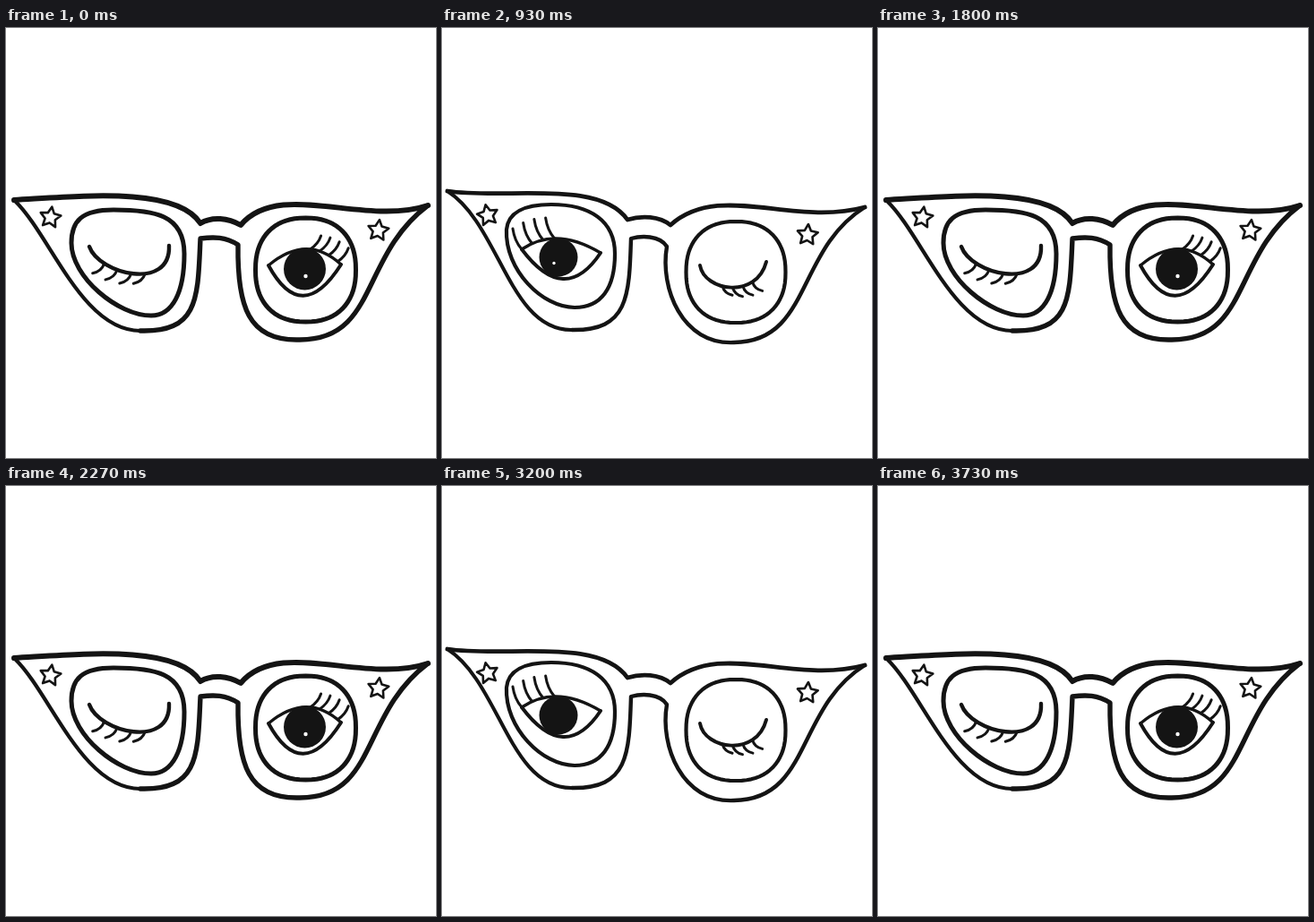
These frames come from a looping animation (480x480 px, 3990 ms). An HTML page with a canvas:

```html
<!DOCTYPE html>
<html lang="en">
<head>
<meta charset="utf-8">
<title>Winking glasses</title>
<style>
html, body { margin: 0; width: 100%; height: 100%; overflow: hidden; background: #fff; }
canvas { display: block; width: 480px; height: 480px; }
</style>
</head>
<body>
<canvas id="stage" width="480" height="480"></canvas>
<script>
const ctx = document.getElementById('stage').getContext('2d');
const INK = '#141414', LOOP = 3990, HALF = 1800, WINK = 930;
ctx.lineCap = ctx.lineJoin = 'round';

function pen(width, path) {
  ctx.lineWidth = width;
  ctx.stroke(new Path2D(path));
}

// Closed shape from a function of the angle
function ring(width, steps, point) {
  const pts = Array.from({ length: steps }, (_, i) => point(i * 2 * Math.PI / steps, i));
  pen(width, 'M' + pts.join('L') + 'Z');
}

function star(x, y, tilt) {
  ring(2.6, 10, (a, i) => {
    const r = i % 2 ? 6 : 12;
    return [x + r * Math.sin(a + tilt), y - r * Math.cos(a + tilt)];
  });
}

// Slightly squared ellipse
function lens(width, x, y, rx, ry) {
  const soft = v => Math.sign(v) * Math.abs(v) ** (2 / 2.3);
  ring(width, 72, a => [x + rx * soft(Math.cos(a)), y + ry * soft(Math.sin(a))]);
}

// Point on a Bezier curve of any degree
function pointAt(pts, t) {
  if (pts.length === 1) return pts[0];
  return pointAt(pts.slice(1).map((p, i) =>
    [0, 1].map(k => pts[i][k] + (p[k] - pts[i][k]) * t)), t);
}

function lid(width, ...pts) {
  const [from, ...rest] = pts;
  pen(width, `M${from}${rest.length > 2 ? 'C' : 'Q'}${rest.join(' ')}`);
  return pts;
}

// Four equal lashes, evenly spaced along a lid
function lashes(pts, start, step, bend, tip) {
  for (let i = 0; i < 4; i++) {
    pen(3, `M${pointAt(pts, start + i * step)}q${bend} ${tip}`);
  }
}

function dot(x, y, r, color) {
  ctx.fillStyle = color;
  ctx.beginPath();
  ctx.arc(x, y, r, 0, 7);
  ctx.fill();
}

function winkLeft() {
  // brows and bridge, then both rims
  pen(6, 'M9,192C80,188 190,176 217,218C230,210 248,212 262,220C305,169 400,222 471,198');
  pen(5.4, 'M471,198C395,255 415,348 328,348C270,350 258,310 259,242C245,233 232,233 217,235C214,300 216,340 150,338');
  pen(4.2, 'M150,338C85,338 50,232 10,193');
  pen(5, 'M73,240C73,215 85,203 120,203C165,203 199,208 199,252C199,295 186,321 162,321C125,321 73,278 73,240');
  lens(5, 334.5, 270, 56, 58);
  star(49.5, 211.5, 0.15);
  star(415.5, 226, 0.12);

  const shut = lid(4.4, [93, 244], [104, 275], [184, 294], [182, 243]);
  lashes(shut, 0.23, 0.125, [-3, 9], [-13, 11]);

  const upper = lid(3.2, [293, 265], [336, 229], [374, 264]);
  lid(4, [293, 265], [330, 333], [374, 264]);
  lashes(upper, 0.56, 0.13, [9, -6], [12, -15]);
  dot(333.5, 269, 23.5, INK);
  dot(334.5, 277, 2.2, '#fff');
}

function winkRight(glint) {
  pen(4.8, 'M6,182C70,192 175,168 207,214C223,209 243,210 255,220C310,171 390,222 472,200');
  pen(4.4, 'M472,200C395,248 412,350 326,351C268,354 243,290 251,244C243,231 222,232 211,235C209,300 208,338 145,337');
  pen(4, 'M145,337C75,338 65,220 6,182');
  pen(4.2, 'M72,225C74,205 92,197 122,197C165,197 193,215 193,252C193,290 178,312 148,312C112,312 70,270 72,225');
  lens(4.2, 328, 272.5, 55.5, 56.5);
  star(51, 209, -0.2);
  star(408, 231, 0.08);

  const shut = lid(4, [288, 265], [293, 294], [351, 303], [362, 261]);
  lashes(shut, 0.4, 0.117, [2, 8], [11, 10]);

  const upper = lid(3.4, [89, 247], [127, 221], [177, 251]);
  lid(4, [89, 247], [137, 311], [177, 251]);
  lashes(upper, 0, 0.15, [-8, -9], [-10, -23]);
  dot(130, 256, 21.5, INK);
  if (glint) dot(125, 262.5, 1.7, '#fff');
}

function draw() {
  const t = performance.now() % LOOP;
  ctx.fillStyle = '#fff';
  ctx.fillRect(0, 0, 480, 480);
  ctx.strokeStyle = INK;
  if (t % HALF < WINK) winkLeft();
  else winkRight(t < 3200);
  requestAnimationFrame(draw);
}
draw();
</script>
</body>
</html>
```
